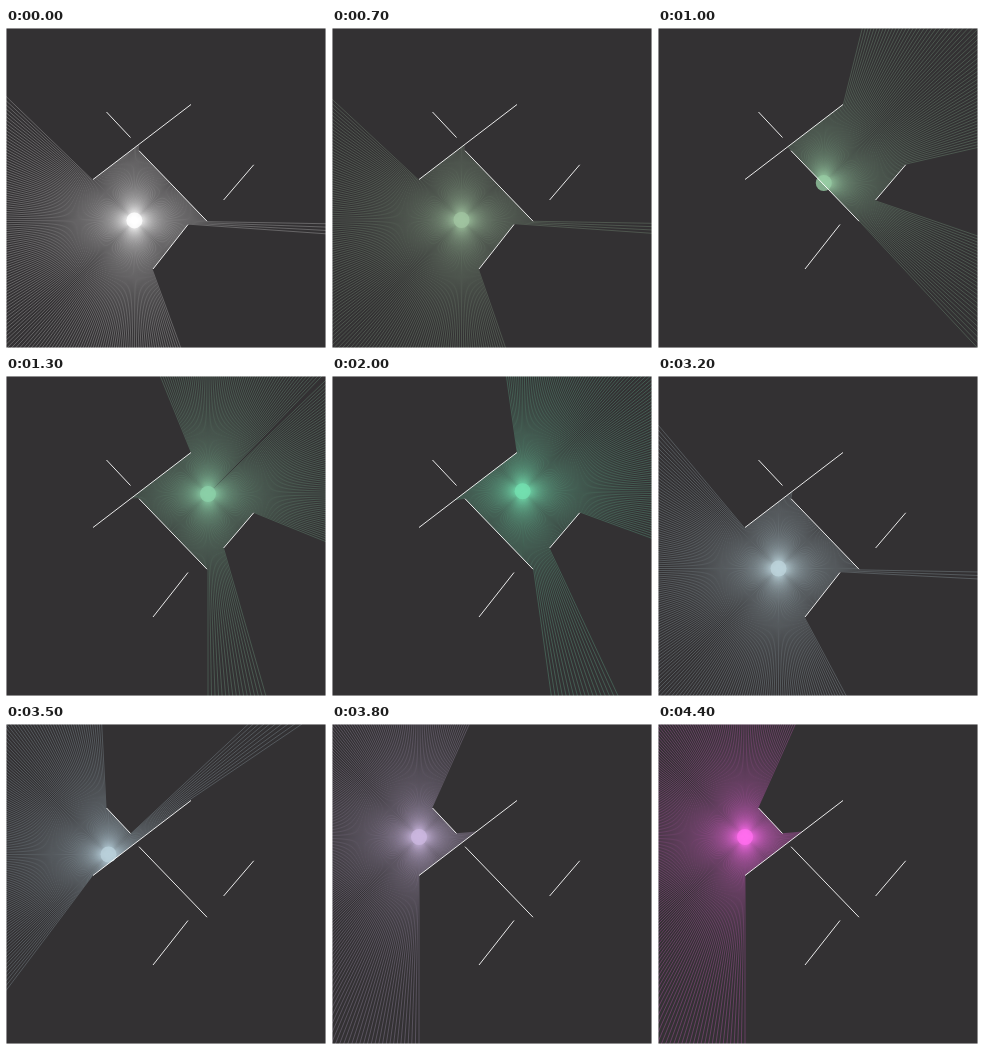
An HTML page with a canvas for the animation above (4800 ms loop, 320 px wide and 320 px high).

```html
<!DOCTYPE html>
<html lang="en">
<head>
<meta charset="utf-8">
<title>Ray casting</title>
<style>
  html, body { margin: 0; width: 100%; height: 100%; overflow: hidden; background: #333133; }
  canvas { display: block; width: 320px; height: 320px; }
</style>
</head>
<body>
<canvas id="stage" width="320" height="320"></canvas>
<script>
const SIZE = 320, LOOP = 4800, STEP = 100, RAYS = 360, EPS = 1e-6;
const ctx = document.getElementById('stage').getContext('2d');

// x1, y1, x2, y2
const walls = [
  [100.5, 84, 124.5, 109.5],
  [185, 76.5, 87, 151.5],
  [133, 122.7, 201, 193.2],
  [247.7, 136.8, 217.6, 172],
  [182, 196.5, 147, 241]
];

// Where the light rests or turns: time, x, y
const path = [
  [400, 128.4, 192.4], [700, 129.5, 192], [1300, 202, 118], [1900, 200, 104],
  [2300, 140, 176], [3200, 120.5, 192.5], [3500, 102.5, 130.5], [3700, 87, 113]
];

// time, r, g, b
const tints = [
  [300, 255, 255, 255], [700, 160, 195, 160], [2300, 105, 230, 178],
  [3200, 188, 210, 218], [3600, 184, 206, 216], [4400, 255, 110, 238]
];

const linear = u => u;
const smooth = u => u * u * (3 - 2 * u);

function sample(keys, t, ease) {
  const i = keys.findIndex(k => k[0] > t);
  if (i === 0) return keys[0].slice(1);
  if (i < 0) return keys[keys.length - 1].slice(1);
  const a = keys[i - 1], b = keys[i];
  const u = ease((t - a[0]) / (b[0] - a[0]));
  return a.slice(1).map((v, n) => v + (b[n + 1] - v) * u);
}

// Distance along the ray to a wall; wall ends do not count as hits
function hit(x, y, dx, dy, [x1, y1, x2, y2]) {
  const wx = x2 - x1, wy = y2 - y1;
  const det = dx * wy - dy * wx;
  if (Math.abs(det) < EPS) return Infinity;
  const px = x1 - x, py = y1 - y;
  const along = (px * wy - py * wx) / det;
  const u = (px * dy - py * dx) / det;
  return along > 0 && u > EPS && u < 1 - EPS ? along : Infinity;
}

function line(x1, y1, x2, y2) {
  ctx.beginPath();
  ctx.moveTo(x1, y1);
  ctx.lineTo(x2, y2);
  ctx.stroke();
}

// The stage edges stop rays like any other wall
const corners = [[0, 0], [SIZE, 0], [SIZE, SIZE], [0, SIZE]];
corners.forEach((c, i) => walls.push([...c, ...corners[(i + 1) % 4]]));

function draw(t) {
  const [x, y] = sample(path, t, smooth);
  const rgb = sample(tints, t, linear).map(Math.round);
  ctx.fillStyle = '#333133';
  ctx.fillRect(0, 0, SIZE, SIZE);

  ctx.strokeStyle = `rgba(${rgb}, 0.4)`;
  ctx.lineWidth = 0.64;
  for (let i = 0; i < RAYS; i++) {
    const a = i / RAYS * 2 * Math.PI, dx = Math.cos(a), dy = Math.sin(a);
    const d = Math.min(...walls.map(w => hit(x, y, dx, dy, w)));
    if (d < Infinity) line(x, y, x + dx * d, y + dy * d);
  }

  ctx.fillStyle = `rgba(${rgb}, 0.8)`;
  ctx.beginPath();
  ctx.arc(x, y, 8, 0, 2 * Math.PI);
  ctx.fill();

  ctx.strokeStyle = '#fff';
  ctx.lineWidth = 0.9;
  for (const w of walls) line(...w);
}

let last = -1;
const start = performance.now();
function tick() {
  const t = Math.floor((performance.now() - start) % LOOP / STEP) * STEP;
  if (t !== last) draw(last = t);
  requestAnimationFrame(tick);
}
tick();
</script>
</body>
</html>
```
